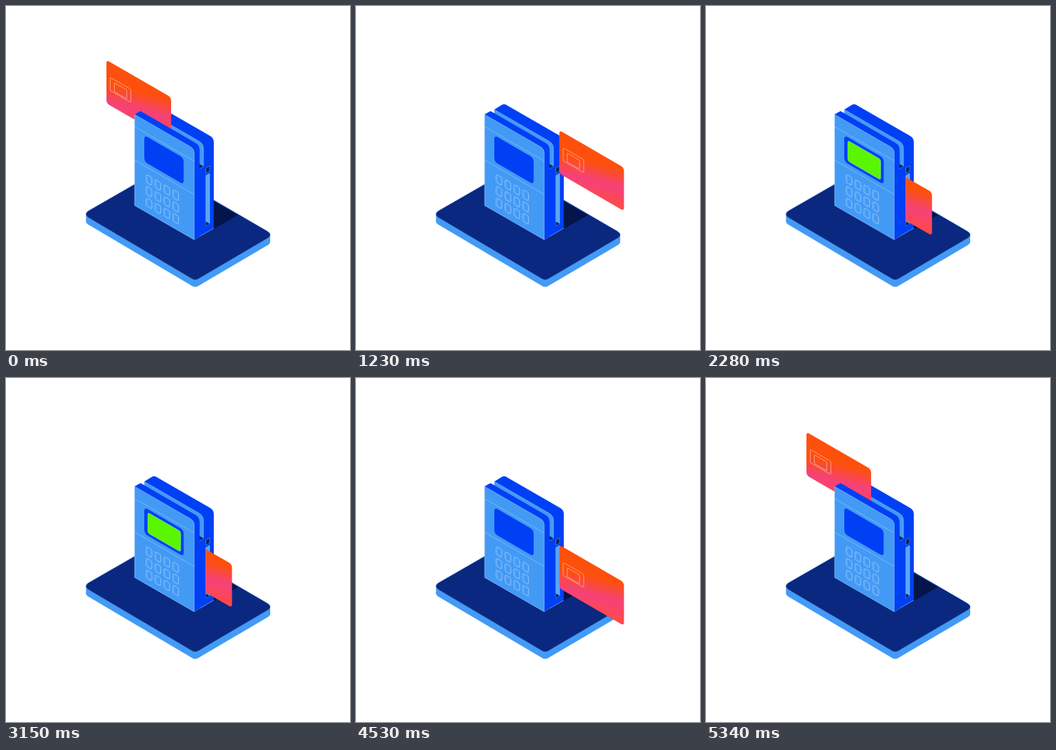
These frames come from a looping animation (500 by 500 pixels, 6 s). An HTML page:

```html
<!DOCTYPE html>
<html lang="en">
<head>
<meta charset="utf-8">
<title>Card reader</title>
<style>
  html, body { margin: 0; width: 100%; height: 100%; overflow: hidden; background: #fff; }
  svg { display: block; width: 100vw; height: 100vh; }
</style>
</head>
<body>
<svg viewBox="0 0 500 500">
  <defs>
    <linearGradient id="cardFill" gradientUnits="userSpaceOnUse" x1="0" y1="0" x2="-22" y2="88.5">
      <stop offset=".36" stop-color="#fd500c"/>
      <stop offset=".65" stop-color="#f5417a"/>
      <stop offset=".95" stop-color="#ff4a48"/>
    </linearGradient>
    <clipPath id="slotClip"><rect id="slotRect" y="0" width="500" height="500"/></clipPath>
  </defs>
  <g id="base"></g>
  <g id="device">
    <g id="back"></g>
    <g clip-path="url(#slotClip)"><g id="card"></g></g>
    <g id="front"></g>
  </g>
</svg>
<script>
const LIGHT = '#439af5', BLUE = '#0040f5', NAVY = '#0a287f', DARK = '#08205f', LINE = '#9accff';
const SLOPE = Math.tan(Math.PI / 6);
const $ = id => document.getElementById(id);

function add(parent, d, attrs) {
  const path = document.createElementNS('http://www.w3.org/2000/svg', 'path');
  for (const [key, value] of Object.entries({ d, fill: 'none', ...attrs })) path.setAttribute(key, value);
  $(parent).append(path);
  return path;
}
const thin = (width = 0.6, stroke = LINE) => ({ stroke, 'stroke-width': width });

// Polygon whose corners are rounded; a point's third value overrides the radius r.
function rounded(points, r) {
  const toward = ([x, y, own = r], [x2, y2]) => {
    const k = own / Math.hypot(x2 - x, y2 - y);
    return [x + (x2 - x) * k, y + (y2 - y) * k];
  };
  const n = points.length;
  return points.map((p, i) =>
    `${i ? 'L' : 'M'}${toward(p, points[(i + n - 1) % n])}Q${p[0]} ${p[1]} ${toward(p, points[(i + 1) % n])}`
  ).join('') + 'Z';
}
// Upright panel facing left: a rectangle sheared along the 30 degree axis.
function panel(x, y, w, h, r) {
  const drop = w * SLOPE;
  return rounded([[x, y], [x + w, y + drop], [x + w, y + drop + h], [x, y + h]], r);
}

// Base plate
const plate = rounded([[111.5, 302.6], [225, 237.2], [388.8, 332.5], [275, 399.2, 5]], 11);
add('base', plate, { fill: LIGHT, transform: 'translate(0 10.3)' });
add('base', 'M116.3 302.6H130V312.9H116.3ZM370 332.5H384V342.8H370Z', { fill: LIGHT });
add('base', plate, { fill: NAVY, ...thin(0.5, '#3f7fd8') });
add('base', 'M302 284L337 304L302 324Z', { fill: '#03154a' });

// Rear half, slot and side face
add('back', 'M201 150.5L212 143.8Q215 142 218 143.5L297 189Q302 192 302 198V323L273.5 339.5L201 298Z', { fill: BLUE });
add('back', 'M201 150.5L281 196.7Q287 200.5 287 207V233L281 237L201 190Z', { fill: LIGHT, ...thin(0.5) });
add('back', 'M281 229.5L287 233L281 236.5Z', { fill: DARK });
add('back', 'M290.5 235.5L296 232.3V240L290.5 243.2Z', { fill: DARK, ...thin(0.6, '#5fa5f5') });
add('back', 'M290.5 246.5L296 243.3V316.5L290.5 319.7Z', { fill: '#55a6f7', ...thin(0.5) });
add('back', 'M290.5 313.3L296 316.5L290.5 319.7Z', { fill: DARK });
add('back', 'M273.5 339.5L302 323', thin(0.6));

// Card
add('card', panel(0, 0, 94, 63, 5), { fill: 'url(#cardFill)' });
add('card', panel(5.5, 25.4, 30, 19, 2), thin(0.7, '#ffc4b6'));
add('card', panel(11.5, 33.2, 18, 13, 1.5), thin(0.7, '#ffc4b6'));

// Front half
add('front', 'M187 157.5L194 153.4Q195.5 152.6 197 153.5L275.5 199Q281.5 202.5 281.5 209.5V334.9L273.5 339.5L187 290Z', { fill: BLUE });
add('front', 'M187 157.8L268 204.5Q273.5 207.8 273.5 214V339.7L187 290Z', { fill: LIGHT, ...thin() });
add('front', 'M187 175.3L273.5 225.2M187 224L273.5 273.9', thin());
add('front', panel(201, 187.8, 57.3, 38.5, 6), { fill: BLUE });
const approved = add('front', panel(206, 195.3, 48, 30, 3.5), { fill: '#5af500', ...thin(0.5) });
for (let col = 0; col < 4; col++) {
  for (let row = 0; row < 3; row++) {
    const x = 203.6 + col * 12.9, y = 244.5 + col * 7.4 + row * 17;
    add('front', panel(x, y, 8.4, 12, 2.5), thin(0.7));
    add('front', panel(x + 1.6, y + 0.8, 6.8, 11, 2), thin(0.4));
  }
}

// Motion
const LOOP = 6000, LEG = 450, MOVE_START = 660;
const STOPS = [[146, 78.4], [295.5, 165.2], [295.5, 251.8], [234.5, 216.6]];
const smooth = u => u * u * (3 - 2 * u);
const settle = u => 1 - (1 - u) ** 2 * (1 + u);
const clamp = (v, lo, hi) => Math.min(hi, Math.max(lo, v));

function cardPosition(progress) {
  const leg = Math.min(2, Math.floor(progress));
  const u = (leg ? smooth : settle)(progress - leg);
  return STOPS[leg].map((from, i) => from + (STOPS[leg + 1][i] - from) * u);
}
function pulse(t, start, length = 240) {
  return Math.sin(Math.PI * clamp((t - start) / length, 0, 1)) ** 2;
}

function render(t) {
  // The way out retraces the way in.
  const inward = Math.min(t, LOOP - t);
  const progress = clamp((inward - MOVE_START) / LEG, 0, 3);
  $('card').setAttribute('transform', `translate(${cardPosition(progress)})`);
  $('slotRect').setAttribute('x', progress > 2 ? 290.5 : 0);

  approved.setAttribute('visibility', t >= 2280 && t < 3720 ? 'visible' : 'hidden');
  const scale = 1 + 0.045 * (pulse(t, 2280) + pulse(t, 3480));
  $('device').setAttribute('transform', `translate(258 240) scale(${scale}) translate(-258 -240)`);
}

const begin = performance.now();
function tick() {
  render((performance.now() - begin) % LOOP);
  requestAnimationFrame(tick);
}
tick();
</script>
</body>
</html>
```
